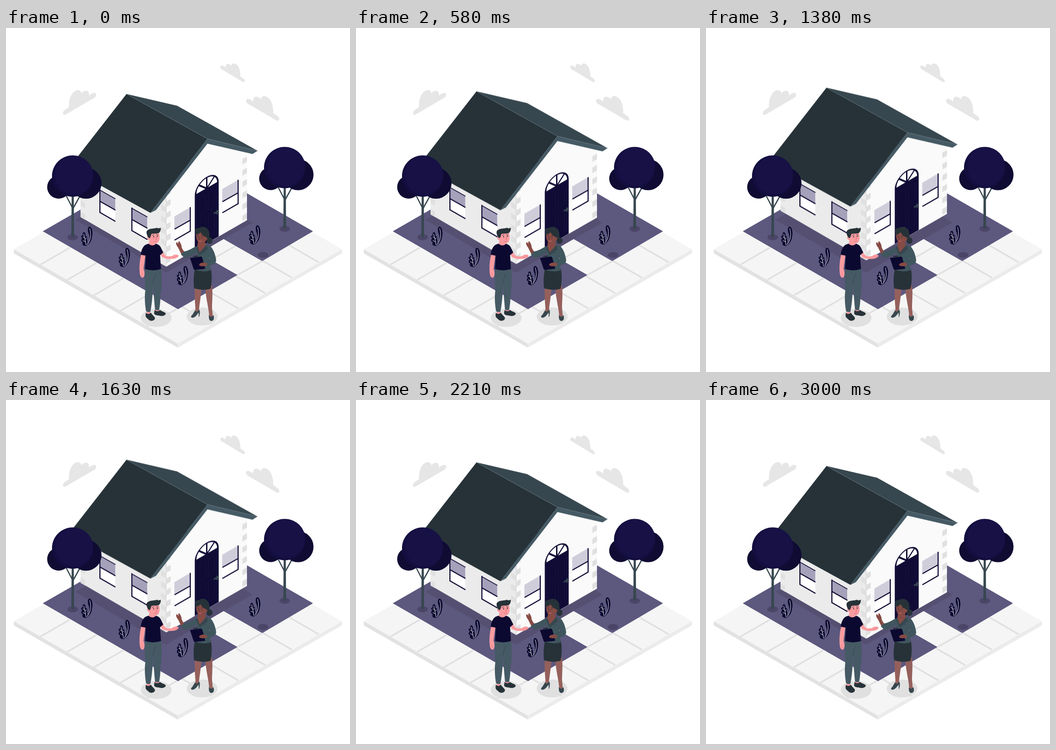
An HTML page that plays this animation: 748x748 px, repeating every 3040 ms.

```html
<!DOCTYPE html>
<html lang="en">
<head>
<meta charset="utf-8">
<title>House viewing</title>
<style>
html, body { margin: 0; width: 100%; height: 100%; overflow: hidden; background: #fff; }
svg { display: block; width: 100vw; height: 100vh; }
.line { fill: none; stroke-linecap: round; stroke-linejoin: round; }
</style>
</head>
<body>
<svg viewBox="0 0 748 748">
  <defs>
    <path id="cloud" fill="#e6e6e6" d="M129 188.500C123 190 122 183 127 179L137 172C136 151 145 136 156 135C161 135 163 138 164 142C169 135 178 134 180 141L181 147C187 140 195 139 196 144C197 148 193 152 188 154Z"/>
    <g id="tree">
      <ellipse cx="145" cy="455" rx="11.500" ry="6.500" fill="#4b4568"/>
      <path class="line" stroke="#37474f" stroke-width="2.600" d="M131 365L145 392M161 365L146 392"/>
      <path fill="#37474f" d="M142.800 362h4.600l.6 92q-3 2-6 0z"/>
      <circle cx="114.500" cy="346" r="25" fill="#0f0b32"/>
      <circle cx="174" cy="337.500" r="33.700" fill="#0f0b32"/>
      <circle cx="145" cy="322" r="45" fill="#130e3f"/>
      <ellipse cx="148" cy="320" rx="41" ry="42" fill="#171146"/>
    </g>
    <g id="bush">
      <path fill="#0c0930" d="M12 42C18 34 20 26 17 17C14 9 14 1 19 1C24 2 27 14 24 23C23 32 19 38 12 42ZM12 43C5 43 1 40 4 35C-1 33 0 28 3 27C-1 22 0 20 4 20C3 15 4 13 7 13C10 14 10 19 10 22C13 20 14 24 13 28C15 32 14 38 12 43Z"/>
      <path class="line" stroke="#fff" stroke-width=".9" d="M13 40C21 32 23 18 19 5M11 41C10 34 8 24 6 17M10 34L4 31M9 28L12 25M8 25L4 23"/>
    </g>
    <g id="sideWindow">
      <path fill="#fff" d="M275 418L307 436V459L275 441Z"/>
      <path fill="#a5a1ba" d="M275 393L307 411V435L275 417Z"/>
      <path fill="none" stroke="#0e0a33" stroke-width="2.400" d="M273.700 390.500V440.500L307.500 460M274 416.500L307.500 435.500"/>
      <path fill="none" stroke="#0e0a33" stroke-width="1.500" d="M273 391.500L307.500 411"/>
    </g>
    <g id="frontWindow">
      <path fill="#fff" d="M367 438L400 419V442L367 461Z"/>
      <path fill="#d0cddb" d="M367 410L400 391V417L367 436Z"/>
      <path fill="none" stroke="#0e0a33" stroke-width="2.400" d="M400.700 389.500V441.500L366.500 461.200M366.500 437.300L400 418.300"/>
      <path fill="none" stroke="#c3bfd0" stroke-width=".7" d="M366.500 436V410L399 391"/>
    </g>
  </defs>

  <use href="#cloud"/>
  <use href="#cloud" transform="translate(718 13) scale(-1 1)"/>
  <use href="#cloud" transform="translate(610.500 -25.500) scale(-.737 .76)"/>

  <path fill="#e2e2e2" d="M17 481L373.500 686V695L17 490Z"/>
  <path fill="#ebebeb" d="M730.500 481L373.500 686V695L730.500 490Z"/>
  <path fill="#f5f5f5" d="M17 481L373.500 275.500L730.500 481L373.500 686Z"/>
  <g id="joints" stroke="#e0e0e0" stroke-width="3.500"></g>
  <path fill="#5c587e" d="M80 442L374 273L667.500 442L557 507L473 459L420 489L503.500 537L374 611.500Z"/>
  <path fill="#f5f5f5" d="M473 459L557 507L503.500 537L420 489Z"/>
  <path stroke="#e0e0e0" stroke-width="3.500" d="M503.500 537L557 507M446 504L499 474"/>
  <path fill="#554f71" d="M151 417L345 306L536 423L473 459L348 532Z"/>
  <ellipse cx="559" cy="493.500" rx="11.500" ry="6.500" fill="#4b4568"/>

  <g id="house">
    <path fill="#ebebeb" d="M162 411L348.500 519V360L162 280Z"/>
    <path fill="#fafafa" d="M348.500 519L524 418V266L438 246L348.500 362Z"/>
    <g id="quoins" fill="#e0e0e0"></g>
    <use href="#sideWindow"/>
    <use href="#sideWindow" x="-69.500" y="-39.500"/>
    <use href="#frontWindow"/>
    <use href="#frontWindow" x="104" y="-59.500"/>
    <g transform="translate(436.500 349) skewY(-30)">
      <path fill="#0f0b35" d="M-26 0A26 25.500 0 0 1 26 0V119H-26Z"/>
      <path fill="#fff" d="M-22.500 -1A22.500 22 0 0 1 22.500 -1Z"/>
      <path class="line" stroke="#0f0b35" stroke-width="3" d="M0 0L-16 -16M0 0V-23M0 0L16 -16"/>
      <path fill="none" stroke="#1a1544" stroke-width=".7" d="M-22 119V3H22V119M-17 12H-3V50H-17ZM3 12H17V50H3ZM-17 60H-3V105H-17ZM3 60H17V105H3Z"/>
    </g>
    <path class="line" stroke="#37474f" stroke-width="3.200" d="M453 403L461 399M459 397V404"/>
    <path fill="#37474f" d="M262 143.500L372 169L547 267L438 241Z"/>
    <path fill="#263238" d="M262 143.500L438 241L314 402L136.500 304.500Z"/>
    <path fill="#455a64" d="M438 241L314 402L326 396L438 251.500L536 274L547 267Z"/>
    <path class="line" stroke="#71818a" stroke-width=".6" d="M262 143.500L438 241L547 267"/>
  </g>

  <use href="#tree"/>
  <use href="#tree" x="461" y="-18.500"/>
  <use href="#bush" x="163" y="431"/>
  <use href="#bush" x="244.500" y="477"/>
  <use href="#bush" x="371" y="516.500"/>
  <use href="#bush" x="528" y="428"/>

  <g id="man">
    <ellipse cx="326.500" cy="630.500" rx="33.500" ry="19.500" fill="#e0e0e0"/>
    <path fill="#f99ca0" d="M306 612H314V622H306ZM324 608H333V617H324Z"/>
    <path fill="#263238" d="M304 619C308 623 312 622 315 619C317 623 324 628 324 631C323 637 315 638 311 635C308 632 303 629 303.500 625ZM323 613C327 617 332 616 335 613C339 617 346 617 347.500 621C346 627 336 627 332 625C328 625 322 624 322 620Z"/>
    <path fill="#455a64" d="M303 520H337C339 545 339 565 336 578C336 591 335 602 333 613Q328 615 324 612C323 600 321 580 320 555C319 580 317 602 314 617Q309 619 304.500 616C302 600 301 585 303 570C302 552 301 535 303 520Z"/>
    <path class="line" stroke="#37474f" d="M320 555Q321 541 326 535"/>
    <path fill="#f99ca0" d="M294 492L303 493C302 504 300 514 299 524C302 529 302 538 299 542C296 545 292 541 291 535C289 520 291 504 294 492ZM335 489L341 486Q344 493 349 496C355 497 360 497 364 494C369 491 374 493 375.500 495C374 499 368 502 362 502C352 503 343 501 338 497Z"/>
    <path class="line" stroke="#ee8088" stroke-width=".8" d="M363 498L374 497M296 532V540"/>
    <path fill="#f99ca0" d="M312 459L325 464L325 473Q318 478 310 471Z"/>
    <path fill="#0c0930" d="M310 469C315 474 322 474 326 469C332 471 335 473 337 478L342 488L335 494L337 524Q320 530 302 524L304 495L293 493C294 483 298 474 304 471Z"/>
    <path fill="#f99ca0" d="M311 445Q322 438 332 444C335 451 335 461 331 466C325 471 316 468 313 461C307 462 305 454 309 452Z"/>
    <path fill="#263238" d="M309 455C305 448 304 441 309 439C314 435 322 437 329 434C329 436 333 436 336 434C338 438 335 444 332 446C326 448 320 446 316 448C315 452 314 456 312 457Z"/>
    <g fill="#263238"><circle cx="321" cy="454" r="1.200"/><circle cx="329" cy="453" r="1.200"/></g>
    <path class="line" stroke="#263238" d="M318 451L322 449.500M327 449.500L331 450"/>
    <path class="line" stroke="#df6670" d="M326 454L327.500 459L325 459.500M322 464Q325 466 328 463"/>
  </g>

  <g id="agent">
    <ellipse cx="426.500" cy="627.500" rx="33.500" ry="19.500" fill="#e0e0e0"/>
    <path fill="#95605c" d="M411 560H425C425 578 421 598 419.500 614L414 624H409L412 611C411 595 409 577 411 560ZM433 560H448C450 581 448 594 448 608L450 631H442C442 611 434 589 433 560Z"/>
    <path fill="#37474f" d="M411 614C413 618 417 617 420 612C423 616 421 624 420 628H419V619C415 623 412 630 405 630C401 629 402 626 405 624ZM441 624C444 629 448 629 451 624C453 630 453 637 446 637C441 636 441 630 441 624Z"/>
    <path fill="#263238" d="M411 523H445C449 537 447 554 445 567Q427 572 409 566C407 551 408 537 411 523Z"/>
    <path fill="#263238" d="M438 455Q450 454 449 464C447 471 438 471 436 465Z"/>
    <path fill="#874b45" d="M390 488L383 494C379 488 377 483 374 477C369 471 369 465 372 466L375 469Q374 463 377 464C380 468 382 472 382 477C384 482 387 486 390 488Z"/>
    <path fill="#40565e" d="M420 472C426 470 436 470 445 475C452 482 456 496 457 505C457 513 448 516 438 517L435 510L444 504L442 495L445 527Q428 532 412 526L415 488C407 493 397 499 388 500L380 492L387 486C397 485 408 476 420 472Z"/>
    <path fill="#874b45" d="M418 459L433 463L434 473L421 489L416 475Z"/>
    <path fill="#37474f" d="M416 473L421 488L436 472L439 481L421 495L413 478Z"/>
    <path class="line" stroke="#37474f" d="M421 490L426 525M429 488L436 489M442 495L444 504L438 509"/>
    <path fill="#0c0930" d="M400 500L424 497Q426 497 427 500L433 522Q433 524 430 524L411 526Q409 526 408 524Z"/>
    <path class="line" stroke="#263238" stroke-width="3" d="M408 497L416 496"/>
    <path fill="#874b45" d="M437 511V517C430 518 424 519 420 516C419 513 424 510 429 510Z"/>
    <path fill="#874b45" d="M414 444Q425 439 436 446L438 459C435 464 428 468 422 467C415 466 412 455 414 444Z"/>
    <path fill="#263238" d="M411 439C413 434 419 436 423 433C433 430 443 438 442 448C444 455 440 461 436 461L434 454C429 453 425 448 423 444C419 449 414 449 411 450Q413 445 411 439Z"/>
    <circle cx="435" cy="458" r="2.800" fill="#874b45"/>
    <g fill="#263238"><circle cx="418" cy="454" r="1.100"/><circle cx="426" cy="455" r="1.100"/></g>
    <path class="line" stroke="#56302d" d="M416 451L419 450.500M425 451L429 452M421 455L419 459L421 460"/>
    <path class="line" stroke="#c5706c" stroke-width="1.400" d="M419 463Q422 465 425 463"/>
  </g>
</svg>
<script>
const byId = id => document.getElementById(id);
const SLOPE = 0.576;

function addPath(parent, d) {
  const path = document.createElementNS("http://www.w3.org/2000/svg", "path");
  path.setAttribute("d", d);
  parent.append(path);
}

// Paving joints run inward from the two outer edges.
for (let i = 0; i < 5; i++) {
  const left = 75 + i * 58, right = 680 - i * 58.2;
  addPath(byId("joints"), `M${left} ${481 + (left - 17) * SLOPE}l64 -37`);
  addPath(byId("joints"), `M${right} ${686 - (right - 373.5) * SLOPE}l-64 -37`);
}

// A column of corner stones, each skewed along its wall.
function stones(x, y, width, rise, count) {
  for (let i = 0; i < count; i++) {
    addPath(byId("quoins"), `M${x} ${y + i * 24.6}l${width} ${rise}v12l${-width} ${-rise}z`);
  }
}
stones(348.5, 353, 9.5, -5.5, 7);
stones(348.5, 365, -11.5, -6.6, 6);
stones(524, 279, -10, 5.8, 6);
stones(162, 350, 10, 5.8, 3);

// The house lifts and settles at a steady speed, then rests briefly.
const LOOP = 3040;
const lift = [[0, 0], [1500, -15], [3000, 0], [LOOP, 0]];
byId("house").animate(
  lift.map(([ms, y]) => ({ offset: ms / LOOP, transform: `translateY(${y}px)` })),
  { duration: LOOP, iterations: Infinity, easing: "linear" }
);
</script>
</body>
</html>
```
